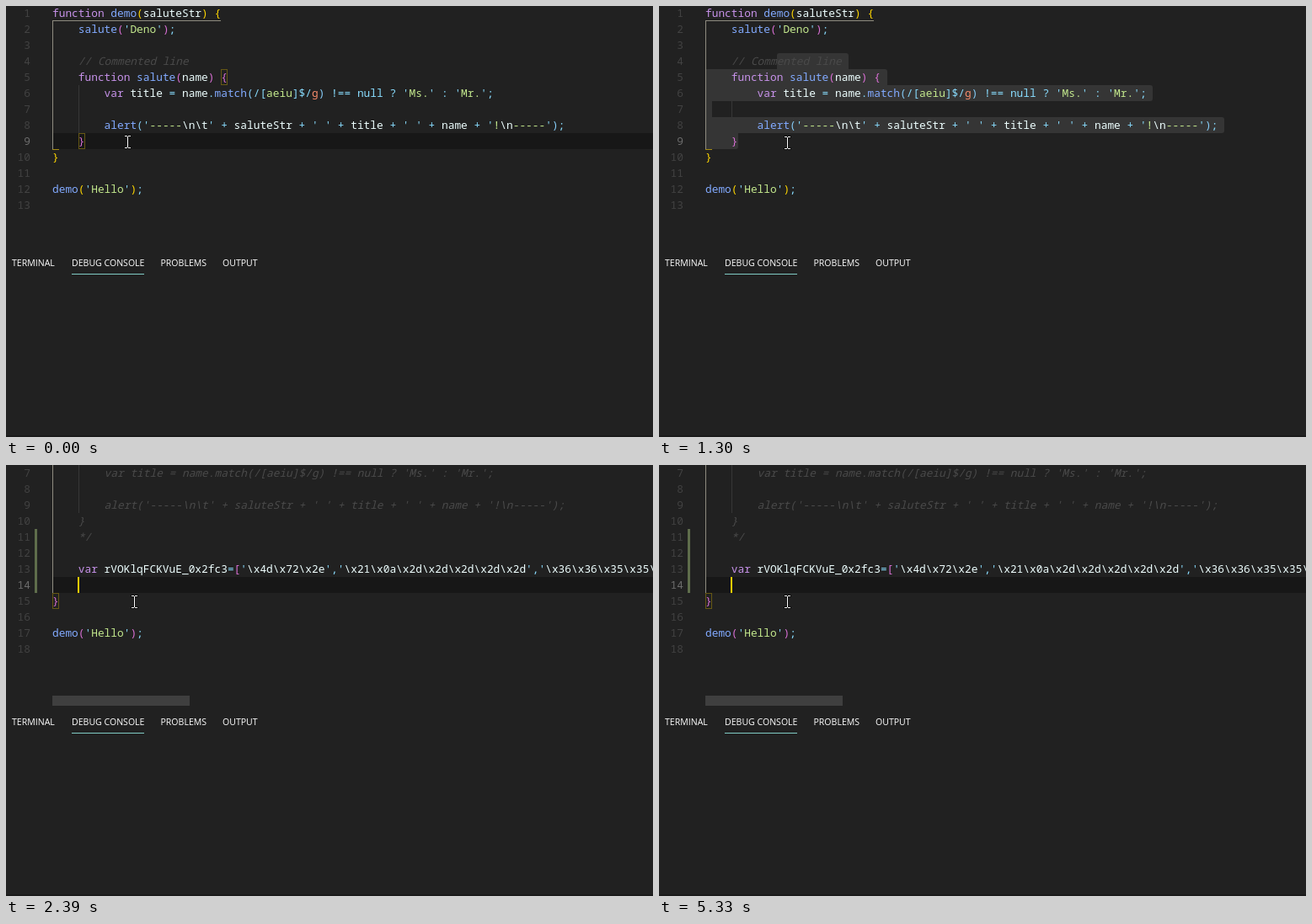
These frames come from a looping animation (768x512 px, 5660 ms). An HTML page with a canvas:

```html
<!DOCTYPE html>
<html lang="en">
<head>
<meta charset="utf-8">
<title>Code editor</title>
<style>
  html, body { margin: 0; width: 100%; height: 100%; overflow: hidden; background: #212121; }
  canvas { display: block; }
</style>
</head>
<body>
<canvas id="stage" width="768" height="512"></canvas>
<script>
const ctx = document.getElementById('stage').getContext('2d');
const LOOP = 5660, LEFT = 55, CHAR = 7.7, ROW = 19, EDITOR_BOTTOM = 286;
const CODE_FONT = '12.83px "Noto Sans Mono", monospace';
const TAB_FONT = '10.55px "Open Sans", sans-serif';
const COLOR = {
  back: '#212121', text: '#eeffff', keyword: '#c792ea', call: '#82aaff', string: '#c3e88d',
  operator: '#89ddff', flag: '#f78c6c', comment: '#4a4a4a', caret: '#ffcc00',
  number: '#424242', activeNumber: '#6c6c6c', select: '#353535', row: '#171717',
  guide: '#363636', box: '#665814', added: '#5f6d4b'
};
const BRACKETS = ['#ffd700', '#da70d6', '#87cefa'];

const inner = [
  '    // Commented line',
  '    function salute(name) {',
  "        var title = name.match(/[aeiu]$/g) !== null ? 'Ms.' : 'Mr.';",
  '',
  "        alert('-----\\n\\t' + saluteStr + ' ' + title + ' ' + name + '!\\n-----');",
  '    }'
];
const head = ['function demo(saluteStr) {', "    salute('Deno');", ''];
const tail = ['}', '', "demo('Hello');", ''];
const packed = "    var rVOKlqFCKVuE_0x2fc3=['\\x4d\\x72\\x2e','\\x21\\x0a\\x2d\\x2d\\x2d\\x2d\\x2d','\\x36\\x36\\x35\\x35\\x35";
const before = [...head, ...inner, ...tail];
const after = [...head, '    /*', ...inner, '    */', '', packed, '    ', ...tail];

// Returns, for every line, a list of { col, text, color, italic }.
function highlight(lines) {
  const lexer = /\/\/.*|'[^']*'?|\/\[.+?\/g|[A-Za-z_]\w*|[()[\]{}]|[^\s\w]+?/g;
  let depth = 0, inComment = false;
  return lines.map(line => {
    const tokens = [];
    const add = (col, text, color, italic) => tokens.push({ col, text, color, italic });
    if (line.includes('/*')) inComment = true;
    if (inComment) {
      const col = line.search(/\S/);
      if (col >= 0) add(col, line.slice(col), COLOR.comment, true);
      if (line.includes('*/')) inComment = false;
      return tokens;
    }
    for (const { 0: word, index } of line.matchAll(lexer)) {
      if (word.startsWith('//')) add(index, word, COLOR.comment, true);
      else if (word[0] === "'") {
        for (const part of word.matchAll(/'|\\x..|\\.|[^'\\]+/g)) {
          const color = part[0] === "'" ? COLOR.operator : part[0][0] === '\\' ? COLOR.text : COLOR.string;
          add(index + part.index, part[0], color);
        }
      } else if (word.startsWith('/[')) {
        [...word].forEach((c, i) => add(index + i, c,
          i === word.length - 1 ? COLOR.flag : /[a-z]/.test(c) ? COLOR.string : COLOR.operator));
      } else if (/[([{]/.test(word)) add(index, word, BRACKETS[depth++ % 3]);
      else if (/[)\]}]/.test(word)) add(index, word, BRACKETS[--depth % 3]);
      else if (/^(function|var)$/.test(word)) add(index, word, COLOR.keyword);
      else if (/^\w/.test(word) && word !== 'null') {
        add(index, word, line[index + word.length] === '(' ? COLOR.call : COLOR.text);
      } else add(index, word, COLOR.operator);
    }
    return tokens;
  });
}
const tokensBefore = highlight(before), tokensAfter = highlight(after);

// Pointer path: time, x, y
const path = [
  [30, 144, 161], [240, 142, 108], [440, 140, 65], [540, 140, 65], [590, 141, 85],
  [640, 143, 116], [690, 145, 136], [790, 148, 158], [1190, 152, 162]
];
function pointerAt(t) {
  t = Math.floor((t - 40) / 50) * 50 + 40;
  const next = path.findIndex(p => p[0] > t);
  if (next === 0) return path[0].slice(1);
  if (next < 0) return path[path.length - 1].slice(1);
  const a = path[next - 1], b = path[next], k = (t - a[0]) / (b[0] - a[0]);
  return [a[1] + (b[1] - a[1]) * k, a[2] + (b[2] - a[2]) * k];
}

const caretToggles = [490, 1300, 1350, 1860, 2390, 2850, 3360, 3860, 4390, 4870, 5330];
const CLICK = 490, DRAG = 590, PASTE = 1350, SCROLL = 1400, SETTLE = 1450, SAVED = 1530, BAR = 1830;

function caretAt(t) {
  if (t < CLICK) return { line: 9, col: 5 };
  if (t >= PASTE) return { line: 14, col: 4 };
  const [x, y] = pointerAt(t - 50);
  const line = Math.floor((y + 1) / ROW) + 1;
  return { line, col: Math.min(before[line - 1].length, Math.floor((x - LEFT) / CHAR)) };
}

const xOf = col => LEFT + col * CHAR;
function rect(color, x, y, w, h) {
  ctx.fillStyle = color;
  ctx.fillRect(Math.round(x), y, Math.round(w), h);
}
function label(text, x, y, color, font, align = 'left') {
  ctx.font = font;
  ctx.fillStyle = color;
  ctx.textAlign = align;
  ctx.fillText(text, x, y);
}

function drawSelection(lines, from, to, top) {
  const span = n => {
    if (n < from.line || n > to.line) return [0, 0];
    return [xOf(n === from.line ? from.col : 0),
      n === to.line ? xOf(to.col) : xOf(lines[n - 1].length + 1)];
  };
  ctx.fillStyle = COLOR.select;
  for (let n = from.line; n <= to.line; n++) {
    const [x, end] = span(n);
    if (end <= x) continue;
    const above = span(n - 1)[1] < end ? 3 : 0, below = span(n + 1)[1] < end ? 3 : 0;
    ctx.beginPath();
    ctx.roundRect(Math.round(x), top(n), Math.round(end - x), ROW, [n === from.line ? 3 : 0, above, below, 0]);
    ctx.fill();
  }
}

function drawScope(scope, top, lastLine = scope.end) {
  const x = Math.round(xOf(scope.indent)), y = top(scope.start) + ROW - 1;
  rect(scope.line, x, y, xOf(scope.brace + 1) - x, 1);
  rect(scope.line, x, y, 1, top(lastLine) - y);
  rect(scope.foot, x, top(scope.end), 8, 1);
}

function drawBox(line, col, top) {
  ctx.strokeStyle = COLOR.box;
  ctx.strokeRect(Math.round(xOf(col)) + 0.5, top(line) + 0.5, 7, ROW - 1);
}

// Bracket colours and borders that lag behind for a moment after the paste
function drawStaleMarks(top) {
  const tints = [
    [6, 14, 1], [6, 19, 1], [6, 21, 1], [7, 25, 2], [7, 36, 2], [7, 66, 2], [9, 8, 2], [9, 72, 2], [9, 77, 1]
  ];
  const bars = [[5, 18], [6, 24], [7, 65], [7, 67], [9, 76]];
  for (const [line, col, depth] of tints) {
    label(after[line - 1][col], xOf(col), top(line) + 14, BRACKETS[depth], 'italic ' + CODE_FONT);
  }
  for (const [line, col] of bars) rect('#80691a', xOf(col), top(line), 1, ROW);
}

function drawPointer([x, y]) {
  x = Math.round(x);
  y = Math.round(y);
  for (const [color, pad] of [['#111', 1], ['#fff', 0]]) {
    const bar = (dx, dy, w, h) => rect(color, x + dx - pad, y + dy - pad, w + 2 * pad, h + 2 * pad);
    bar(0, -6, 1, 13);
    for (const dy of [-7, 7]) {
      bar(-3, dy, 3, 1);
      bar(1, dy, 3, 1);
    }
  }
}

function drawEditor(t) {
  const pasted = t >= PASTE, lines = pasted ? after : before;
  const top = n => (t < SCROLL ? -1 : -114 + 0) + (n - 1) * ROW;
  const caret = caretAt(t);
  const selecting = t >= DRAG && t < SCROLL;
  const demo = { start: 1, end: pasted ? 15 : 10, indent: 0, brace: 25, line: '#8f8c80', foot: '#a58c14' };
  const salute = { start: 5, end: 9, indent: 4, brace: 26, line: '#9d5f9b', foot: '#9d5f9b' };

  if (!selecting) rect(COLOR.row, LEFT, top(caret.line), 768 - LEFT, ROW);
  const bodyStart = pasted ? 7 : 6;
  rect(COLOR.guide, LEFT, top(2), 1, (demo.end - 2) * ROW);
  rect(COLOR.guide, xOf(4), top(bodyStart), 1, 3 * ROW);

  if (selecting) drawSelection(lines, pasted ? { line: 4, col: 0 } : { line: 4, col: 11 }, caret, top);

  const inSalute = !pasted && caret.line > 5 && caret.line < 9;
  drawScope(inSalute ? salute : demo, top, pasted && t < SCROLL ? 5 : undefined);

  if (t < CLICK) {
    drawBox(5, 26, top);
    drawBox(9, 4, top);
  } else if (t < DRAG || t >= SETTLE) {
    drawBox(1, 25, top);
    drawBox(demo.end, 0, top);
  }
  if (t >= SAVED) rect(COLOR.added, 34, top(11), 3, 4 * ROW);

  (pasted ? tokensAfter : tokensBefore).forEach((tokens, i) => {
    const n = i + 1, y = top(n) + 14;
    label(n, 29, y, n === caret.line ? COLOR.activeNumber : COLOR.number, CODE_FONT, 'right');
    for (const { col, text, color, italic } of tokens) {
      label(text, xOf(col), y, color, (italic ? 'italic ' : '') + CODE_FONT);
    }
  });
  if (pasted && t < SCROLL) drawStaleMarks(top);

  if (caretToggles.filter(time => time <= t).length % 2) {
    rect(COLOR.caret, Math.floor(xOf(caret.col)), top(caret.line), 2, ROW);
  }
  if (t >= BAR) rect('#3f3f3f', LEFT, 274, 163, 12);
}

function drawPanel() {
  const tabs = [['TERMINAL', 7], ['DEBUG CONSOLE', 78], ['PROBLEMS', 183.5], ['OUTPUT', 257]];
  for (const [name, x] of tabs) label(name, x, 309, '#fff', TAB_FONT);
  rect('#80cbc4', 78, 318, 86, 1);
  rect('#1a1a1a', 0, 510, 768, 2);
}

function draw(now) {
  const t = now % LOOP;
  rect(COLOR.back, 0, 0, 768, 512);
  ctx.save();
  ctx.beginPath();
  ctx.rect(0, 0, 768, EDITOR_BOTTOM);
  ctx.clip();
  drawEditor(t);
  ctx.restore();
  drawPanel();
  drawPointer(pointerAt(t));
}

const began = performance.now();
function tick() {
  draw(performance.now() - began);
  requestAnimationFrame(tick);
}
tick();
</script>
</body>
</html>
```
